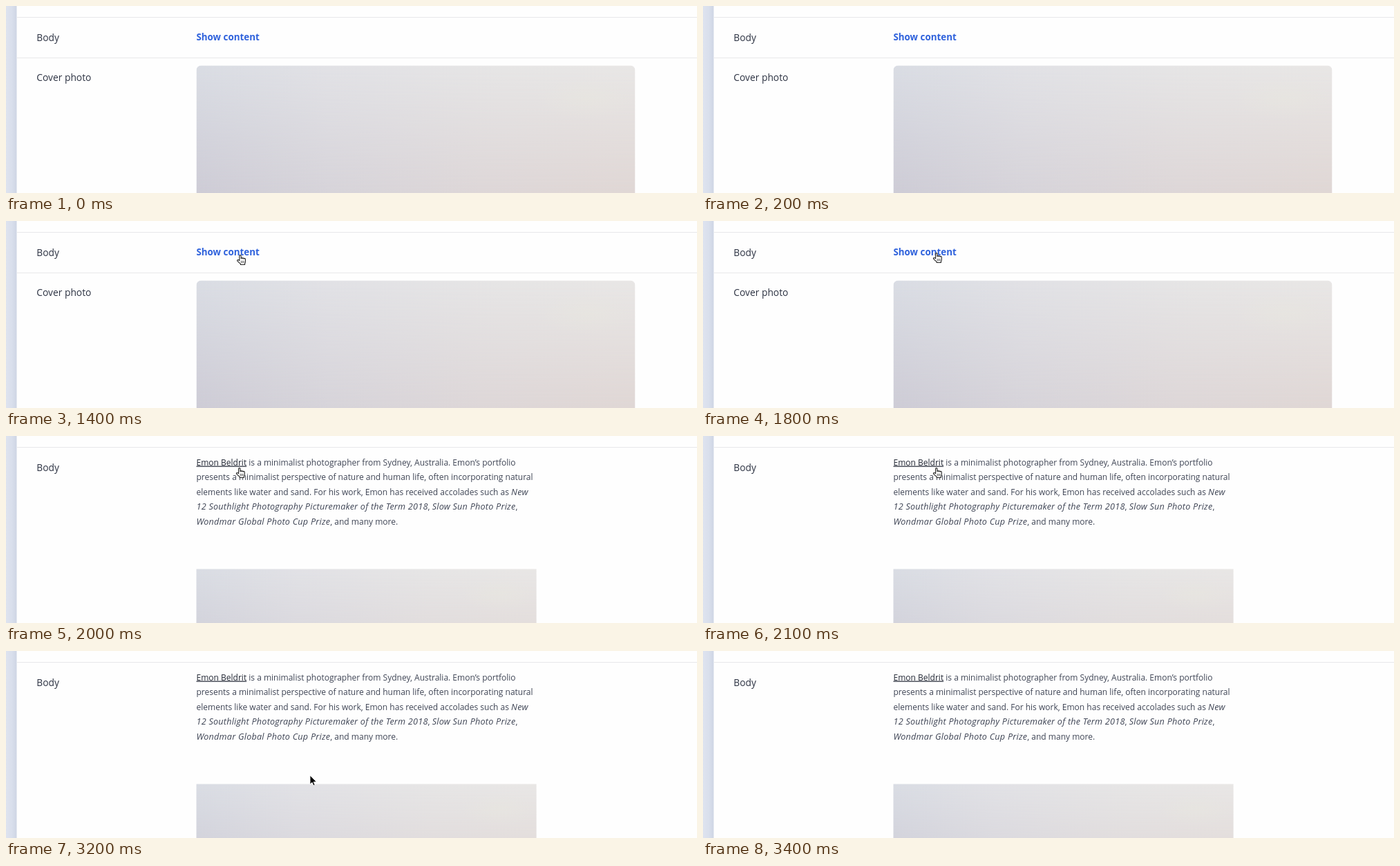
These frames come from a looping animation (1000x272 px, 4.1 s). An HTML page:

```html
<!DOCTYPE html>
<html lang="en">
<head>
<meta charset="utf-8">
<title>Show content</title>
<style>
  html, body { margin: 0; width: 100%; height: 100%; overflow: hidden; background: #fefefe; }
  svg { display: block; width: 1000px; height: 272px; }
  text { font-family: "Open Sans", "Noto Sans", sans-serif; white-space: pre; }
  .label { font-size: 13.8px; fill: #2c3242; }
  .link { font-size: 13.4px; font-weight: 700; fill: #2f62dc; }
  .prose text { font-size: 12px; fill: #3f4555; }
  .prose .name { fill: #232835; text-decoration: underline; text-underline-offset: 2px; }
  .prose .title { font-size: 12.6px; font-style: italic; letter-spacing: .25px; }
  .rule { stroke: #e8e8ea; }
</style>
</head>
<body>
<svg viewBox="0 0 1000 272">
  <defs>
    <linearGradient id="edge">
      <stop offset="0" stop-color="#dee3ef"/>
      <stop offset=".55" stop-color="#d9dfec"/>
      <stop offset="1" stop-color="#ced5e4"/>
    </linearGradient>
    <linearGradient id="sky">
      <stop offset="0" stop-color="#dadde4"/>
      <stop offset=".3" stop-color="#e2e2e6"/>
      <stop offset=".7" stop-color="#e7e6e6"/>
      <stop offset="1" stop-color="#e9e7e6"/>
    </linearGradient>
    <linearGradient id="haze">
      <stop offset="0" stop-color="#cdcbd5"/>
      <stop offset=".3" stop-color="#d6d3d9"/>
      <stop offset=".65" stop-color="#ddd6d7"/>
      <stop offset="1" stop-color="#dfd6d4"/>
    </linearGradient>
    <linearGradient id="fade" x2="0" y2="1">
      <stop offset="0" stop-color="#fff" stop-opacity="0"/>
      <stop offset="1" stop-color="#fff"/>
    </linearGradient>
    <mask id="lower" maskContentUnits="objectBoundingBox">
      <rect width="1" height="1" fill="url(#fade)"/>
    </mask>
    <radialGradient id="glow">
      <stop offset="0" stop-color="#e8e7df" stop-opacity=".5"/>
      <stop offset="1" stop-color="#e8e7df" stop-opacity="0"/>
    </radialGradient>
    <clipPath id="rounded"><rect width="635" height="220" rx="7"/></clipPath>
    <g id="photo">
      <rect width="635" height="190" fill="url(#sky)"/>
      <rect width="635" height="190" fill="url(#haze)" mask="url(#lower)"/>
      <ellipse cx="565" cy="48" rx="70" ry="30" fill="url(#glow)"/>
    </g>
  </defs>

  <rect width="1000" height="272" fill="#fefefe"/>
  <rect width="15.5" height="272" fill="url(#edge)"/>
  <path class="rule" d="M16 16.5H1000"/>
  <text class="label" x="44.3" y="50.6">Body</text>

  <g id="closed">
    <text class="link" x="275.4" y="50.4">Show content</text>
    <path class="rule" d="M16 75.5H1000"/>
    <text class="label" x="44.3" y="109">Cover photo</text>
    <g transform="translate(275.5 86.5)" clip-path="url(#rounded)"><use href="#photo"/></g>
  </g>

  <g id="open" class="prose">
    <text x="275.5" y="42.6"><tspan class="name">Emon Beldrit</tspan> is a minimalist photographer from Sydney, Australia. Emon’s portfolio</text>
    <text x="275.5" y="64.2">presents a minimalist perspective of nature and human life, often incorporating natural</text>
    <text x="275.5" y="85.8">elements like water and sand. For his work, Emon has received accolades such as <tspan class="title">New</tspan></text>
    <text x="275.5" y="107.3"><tspan class="title">12 Southlight Photography Picturemaker of the Term 2018</tspan>, <tspan class="title">Slow Sun Photo Prize</tspan>,</text>
    <text x="275.5" y="128.9"><tspan class="title">Wondmar Global Photo Cup Prize</tspan>, and many more.</text>
    <use href="#photo" transform="translate(275.5 193.5) scale(.775)"/>
  </g>

  <g id="pointer" stroke-linejoin="round" stroke-linecap="round">
    <path id="arrow" d="M0 0V13L3 10.2 5 14.8 7.1 13.9 5.2 9.4H9.2Z" fill="#000" stroke="#fff" stroke-width=".9"/>
    <g id="hand" fill="#fff" stroke="#222" stroke-width="1.1">
      <path d="M4 8.6V1.8a1.2 1.2 0 0 1 2.4 0V5.6a1.1 1.1 0 0 1 2.2 .2a1 1 0 0 1 2.1 .4a1 1 0 0 1 2 .6V10q0 1.6-.9 3V14.5H5.6V13.4L1.2 9.3q-.8-1.2 .3-1.7q1-.3 2.5 1Z"/>
      <path d="M6.6 9.2V12M8.5 9.2V12M10.4 9.2V12" stroke-width=".7"/>
    </g>
    <g id="beam" fill="none">
      <path id="bar" d="M-2.6 -6.5Q0 -6.5 0 -5V5Q0 6.5 -2.6 6.5M2.6 -6.5Q0 -6.5 0 -5V5Q0 6.5 2.6 6.5M-1.4 1.8H1.4" stroke="#fff" stroke-width="2.4"/>
      <path d="M-2.6 -6.5Q0 -6.5 0 -5V5Q0 6.5 -2.6 6.5M2.6 -6.5Q0 -6.5 0 -5V5Q0 6.5 2.6 6.5M-1.4 1.8H1.4" stroke="#222" stroke-width="1.1"/>
    </g>
  </g>
</svg>
<script>
  const LOOP = 4100, OPEN_AT = 2000;
  // start time, pointer shape, x, y
  const steps = [
    [0, ""],
    [1000, "arrow", 338, 266.5],
    [1100, "arrow", 339, 192],
    [1200, "arrow", 341, 118],
    [1300, "arrow", 343, 73],
    [1400, "hand", 333.8, 49],
    [1500, "hand", 333.2, 46.6],
    [1700, "hand", 332.9, 46.3],
    [1800, "hand", 332.6, 46],
    [2900, "beam", 355.5, 62],
    [3000, "beam", 374, 84],
    [3100, "arrow", 402, 124],
    [3200, "arrow", 440, 181],
    [3300, "arrow", 482, 249],
    [3400, ""]
  ];
  const el = id => document.getElementById(id);
  const show = (id, on) => { el(id).style.display = on ? "" : "none"; };

  function draw(now) {
    const t = now % LOOP;
    const [, shape, x = 0, y = 0] = steps.findLast(s => s[0] <= t);
    show("closed", t < OPEN_AT);
    show("open", t >= OPEN_AT);
    for (const id of ["arrow", "hand", "beam"]) show(id, id === shape);
    el("pointer").setAttribute("transform", `translate(${x} ${y})`);
  }

  function tick() {
    draw(performance.now());
    requestAnimationFrame(tick);
  }
  tick();
</script>
</body>
</html>
```
